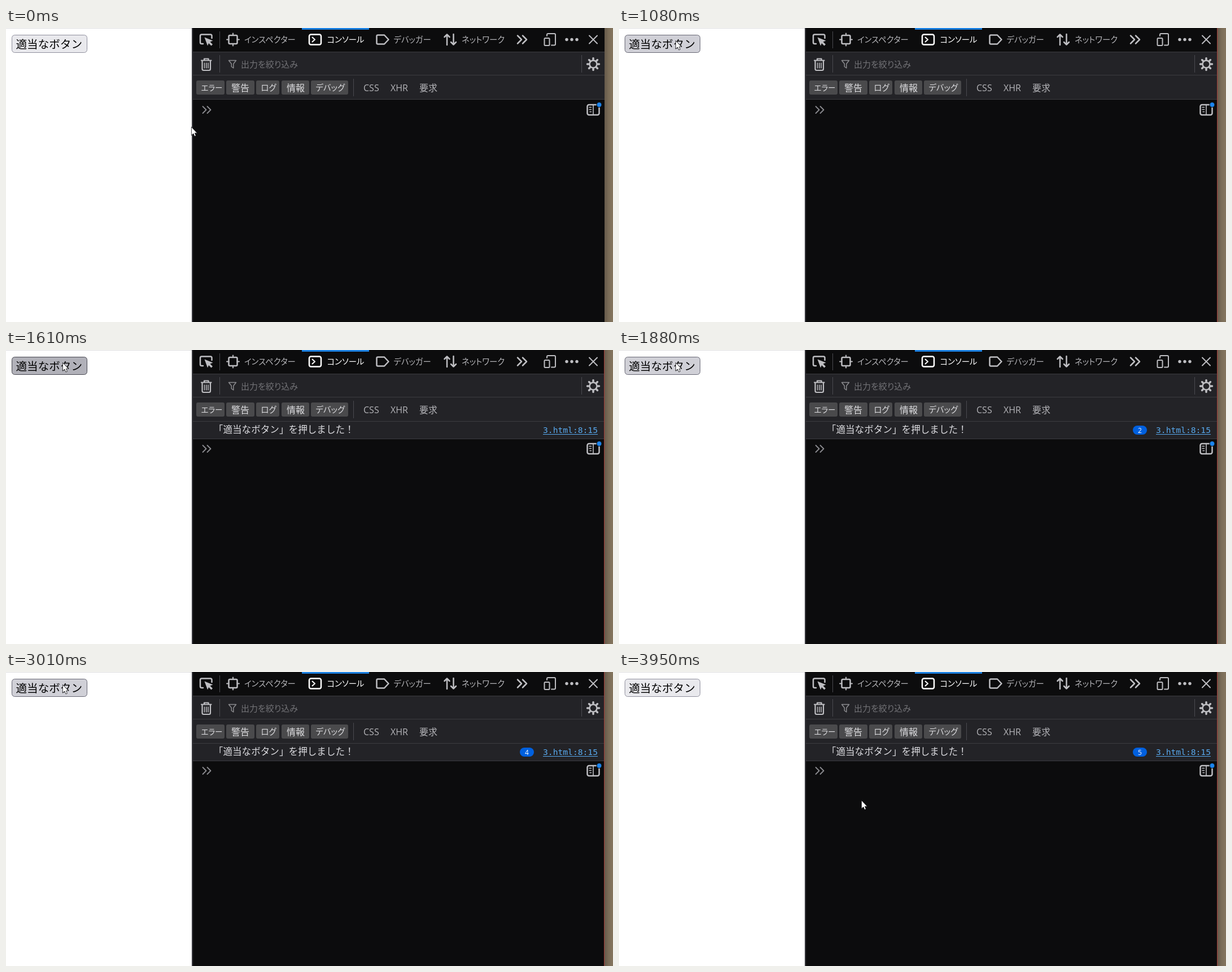
Recreate the animation shown at these times as an HTML page. Size 1075 px wide and 521 px high, loop 4.02 s.

```html
<!DOCTYPE html>
<html lang="ja">
<head>
<meta charset="utf-8">
<style>
  html, body { margin: 0; height: 100%; overflow: hidden; background: #fff; }
  svg { display: block; width: 100vw; height: 100vh; }
  text { font-family: "Open Sans", "Noto Sans CJK JP", "Noto Sans CJK", sans-serif; fill: #b4b4b8; }
  .jp { font-family: "Noto Sans CJK JP", "Noto Sans CJK", sans-serif; }
  .ui { font-size: 14.4px; font-feature-settings: "palt"; }
  .kanji { font-size: 16px; }
  .chips rect { fill: #4a4a4c; }
  .chips text { fill: #dcdcdf; }
  .line { fill: none; stroke: #bebec2; stroke-width: 2.5; stroke-linejoin: round; stroke-linecap: round; }
  .fill { fill: #bebec2; }
  .rule { fill: none; stroke: #3c3c40; }
</style>
</head>
<body>
<svg viewBox="0 0 1075 521" preserveAspectRatio="none">
  <defs>
    <linearGradient id="wall">
      <stop stop-color="#665a4b"/><stop offset=".5" stop-color="#7b6d58"/><stop offset="1" stop-color="#84755e"/>
    </linearGradient>
  </defs>

  <!-- page -->
  <rect width="1075" height="521" fill="#fff"/>
  <rect width="330" height="1" fill="#dedee0"/>
  <rect id="button" x="10.5" y="12.5" width="133" height="31" rx="5"/>
  <text class="jp" x="17.5" y="35.5" font-size="19.6" style="fill:#000">適当なボタン</text>

  <!-- panel -->
  <rect x="329" width="731" height="521" fill="#0c0c0d"/>
  <rect x="329" width="2" height="521" fill="#38383d"/>
  <rect x="331" y="42" width="729" height="85" fill="#232327"/>
  <rect x="524" width="119" height="3" fill="#1b7fdf"/>
  <path class="rule" d="M331 42.5H1060M331 83.5H1060M331 126.5H1060"/>
  <path class="rule" style="stroke:#4a4a4f" d="M378.5 6V36M378.5 48V79M1019.5 48V79M615.5 90V121"/>
  <rect x="1060" width="15" height="521" fill="url(#wall)"/>

  <!-- tabs -->
  <g class="line">
    <path d="M349 28H346.5a2.5 2.5 0 0 1-2.5-2.5V14a2.5 2.5 0 0 1 2.5-2.5H362a2.5 2.5 0 0 1 2.5 2.5V18"/>
    <rect x="394.5" y="13" width="15" height="15" rx="2"/>
    <path d="M402 9.5V13M402 28V31.5M391 20.5H394.5M409.5 20.5H413" stroke-width="2"/>
    <g stroke="#fff"><rect x="537" y="11.5" width="21" height="18" rx="3"/><path d="M542.5 16.5L547 20.5 542.5 24.5" stroke-width="2"/></g>
    <path d="M658.5 12.5H670L677.5 20.5 670 28.5H658.5a2 2 0 0 1-2-2V14.5a2 2 0 0 1 2-2z"/>
    <path d="M781 30V11.5M776.5 16L781 11.5 785.5 16M792.5 11V29.5M788 25L792.5 29.5 797 25"/>
    <path d="M906 13.5L913 20.5 906 27.5M915 13.5L922 20.5 915 27.5"/>
    <path d="M958 14V12a2 2 0 0 1 2-2H971a2 2 0 0 1 2 2V28.5a2 2 0 0 1-2 2H966" stroke-width="2"/>
    <rect x="953.5" y="18" width="9" height="13" rx="1.5" stroke-width="2"/>
    <path d="M1033 13.5L1047 27.5M1047 13.5L1033 27.5" stroke-width="2"/>
  </g>
  <g class="fill">
    <path d="M351.5 16.5L366.5 22.5 361.5 24.5 366 29 363.5 31.5 359 27 357 31.5z"/>
    <circle cx="993" cy="20.5" r="2.7"/><circle cx="1002" cy="20.5" r="2.7"/><circle cx="1011" cy="20.5" r="2.7"/>
  </g>
  <g class="ui">
    <text x="422" y="26">インスペクター</text>
    <text x="568.5" y="26" style="fill:#fff">コンソール</text>
    <text x="686.5" y="26">デバッガー</text>
    <text x="807" y="26">ネットワーク</text>
  </g>

  <!-- filter bar -->
  <g class="line">
    <path d="M346 57.5H363.5M351 57V54.5H358.5V57M347.5 58V72.5a2.5 2.5 0 0 0 2.5 2.5H359.5a2.5 2.5 0 0 0 2.5-2.5V58" stroke-width="2.2"/>
    <path d="M351.5 62V71M354.8 62V71M358 62V71" stroke-width="1.5"/>
    <path d="M394.5 57.5H407.5L402.8 63.5V71L399.3 68.5V63.5z" stroke="#8a8a8e" stroke-width="1.5"/>
    <circle cx="1040" cy="64" r="6.5"/>
    <g id="teeth" stroke-width="3.5"></g>
  </g>
  <text class="ui" x="416" y="69.5" style="font-size:15px;fill:#737377">出力を絞り込み</text>

  <!-- categories -->
  <g class="chips ui">
    <rect x="337" y="93" width="50" height="25" rx="3"/><text x="345.5" y="111" style="font-size:13.5px">エラー</text>
    <rect x="390" y="93" width="50" height="25" rx="3"/><text x="399" y="111.5" class="kanji">警告</text>
    <rect x="443" y="93" width="41" height="25" rx="3"/><text x="451.5" y="111">ログ</text>
    <rect x="488" y="93" width="49" height="25" rx="3"/><text x="497" y="111.5" class="kanji">情報</text>
    <rect x="540" y="93" width="66" height="25" rx="3"/><text x="548.5" y="111">デバッグ</text>
  </g>
  <g class="kanji">
    <text x="633" y="111.5">CSS</text><text x="681" y="111.5">XHR</text><text x="732" y="111.5">要求</text>
  </g>

  <!-- console -->
  <g id="log">
    <rect x="331" y="127" width="729" height="30" fill="#232327"/>
    <path class="rule" d="M331 157.5H1060"/>
    <text class="jp" x="367.8" y="146.5" font-size="16.6" font-weight="300" style="fill:#dcdce0">「適当なボタン」を押しました！</text>
    <text x="951" y="147" style="font:14.65px 'DejaVu Sans Mono',monospace;fill:#58a9ee">3.html:8:15</text>
    <path d="M951 149.5H1048" stroke="#58a9ee"/>
    <g id="badge">
      <rect x="910" y="134" width="25" height="16" rx="8" fill="#0060df"/>
      <text id="count" x="922.5" y="146.5" font-size="12" text-anchor="middle" style="fill:#fff"></text>
    </g>
  </g>
  <g id="prompt">
    <path class="line" d="M348.5 139L354.5 145 348.5 151M356.5 139L362.5 145 356.5 151" style="stroke:#8c8c90;stroke-width:1.8"/>
    <rect class="line" x="1029.5" y="136" width="21" height="18" rx="3"/>
    <path class="line" d="M1040 137V153M1033 140.5H1036.5M1033 144.5H1036.5M1034 148.5H1036.5" style="stroke-width:1.6"/>
    <circle cx="1050.5" cy="136" r="4.5" fill="#1b84ee" stroke="#0c0c0d"/>
  </g>
  <rect id="focus" x="1059" width="1" height="521" fill="#a33c38"/>

  <path id="cursor" d="M.4.4V15.2L3.8 12.1 5.9 17 8.4 16 6.4 11.2H10.6z" fill="#fff" stroke="#101014" stroke-width=".8"/>
</svg>
<script>
const $ = id => document.getElementById(id);
const LOOP = 4020;
const rest = [328, 175], below = [108, 44], over = [100, 22], away = [429, 227];
const moves = [
  { start: 100, step: 65, n: 9, from: rest, to: below },
  { start: 680, step: 100, n: 3, from: below, to: over },
  { start: 3610, step: 68, n: 6, from: over, to: away }
];
// press, release, logged
const clicks = [
  [1230, 1290, 1340], [1610, 1810, 1880], [2210, 2350, 2410],
  [2740, 2940, 3010], [3210, 3340, 3410]
];
const looks = {
  idle: ['#e9e9ed', '#8f8f9d'],
  hover: ['#d0d0d7', '#676774'],
  active: ['#b1b1b9', '#484851']
};

$('teeth').innerHTML = Array.from({ length: 8 }, (_, i) =>
  `<path d="M1040 56V53.5" transform="rotate(${i * 45} 1040 64)"/>`).join('');

function cursorAt(t) {
  let pos = rest;
  for (const { start, step, n, from, to } of moves) {
    if (t < start) break;
    const p = Math.min(n, Math.floor((t - start) / step) + 1) / n;
    const e = p * p * (3 - 2 * p);
    pos = from.map((v, i) => Math.round(v + (to[i] - v) * e));
  }
  return pos;
}

const show = (id, on) => $(id).setAttribute('visibility', on ? 'inherit' : 'hidden');

function draw(t) {
  const [x, y] = cursorAt(t);
  const pressed = clicks.some(([down, up]) => t >= down && t < up);
  const inside = x >= 10 && x < 144 && y >= 12 && y < 44;
  const [fill, stroke] = looks[pressed ? 'active' : inside ? 'hover' : 'idle'];
  const count = clicks.filter(c => t >= c[2]).length;

  $('button').setAttribute('fill', fill);
  $('button').setAttribute('stroke', stroke);
  $('cursor').setAttribute('transform', `translate(${x} ${y})`);
  $('prompt').setAttribute('transform', `translate(0 ${count ? 30 : 0})`);
  $('count').textContent = count;
  show('focus', t >= 1080);
  show('log', count > 0);
  show('badge', count > 1);
}

const t0 = performance.now();
function frame() {
  draw((performance.now() - t0) % LOOP);
  requestAnimationFrame(frame);
}
frame();
</script>
</body>
</html>
```
